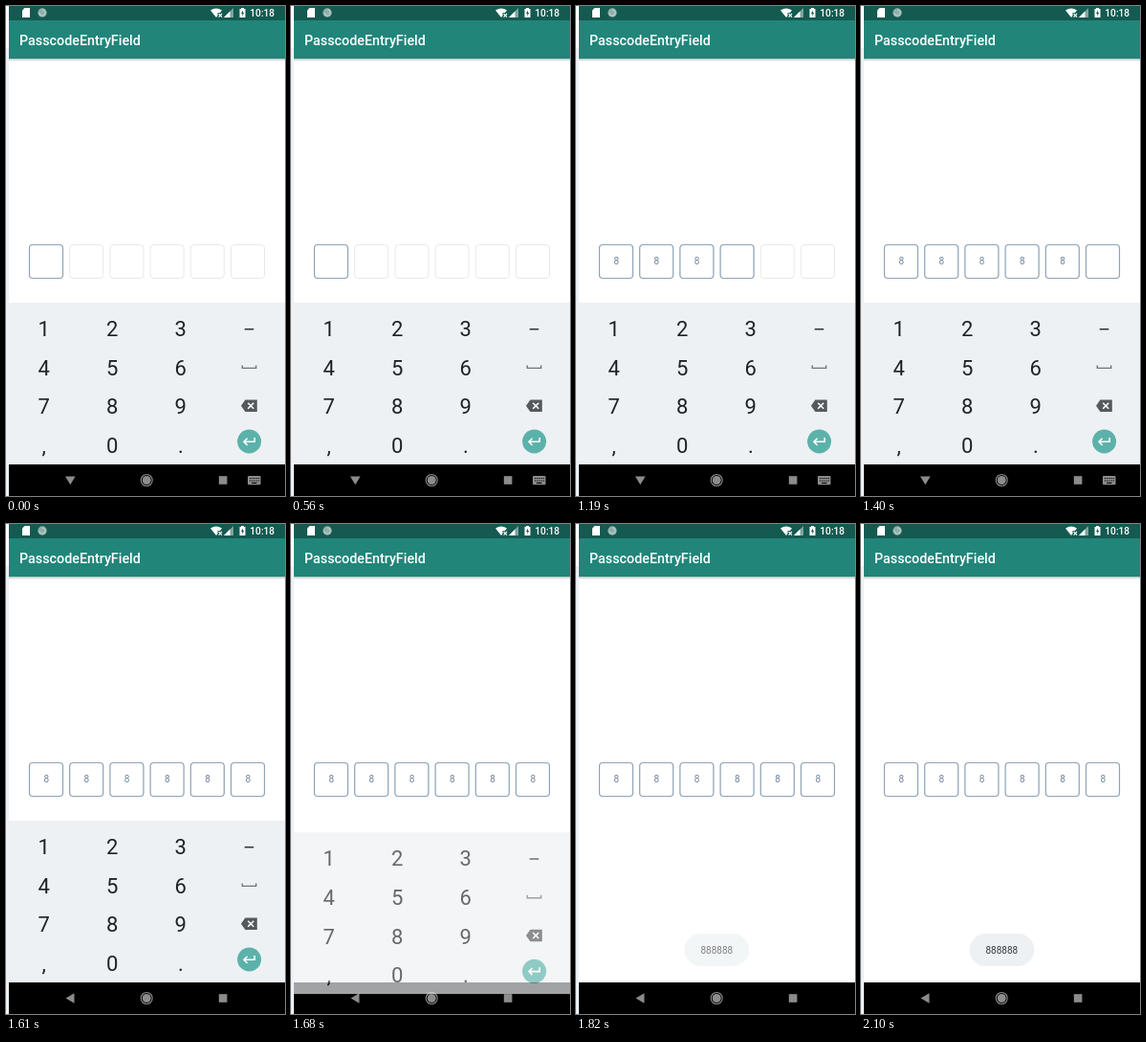
These frames come from a looping animation (292x512 px, 2.17 s). An HTML page:

```html
<!DOCTYPE html>
<html lang="en">
<head>
<meta charset="utf-8">
<title>Passcode entry</title>
<style>
@property --typed { syntax: "<number>"; inherits: true; initial-value: 0; }
html, body { margin: 0; width: 100%; height: 100%; overflow: hidden; background: #fff; }
svg { display: block; width: 100vw; height: 100vh; font-family: Roboto, Arial, sans-serif; }
.loop, #cells { animation: 2170ms step-end infinite; }
#cells { animation-name: type; }
#keyboard { animation-name: slide; }
#toast { animation-name: toast; }
.open { animation-name: open; }
.closed { animation-name: closed; }
.lit { opacity: clamp(0, var(--typed) - var(--i) + 1, 1); }
.digit { opacity: clamp(0, var(--typed) - var(--i), 1); }

@keyframes type {
  0% { --typed: 0; }
  35.48% { --typed: 1; }
  45.16% { --typed: 2; }
  51.61% { --typed: 3; }
  58.06% { --typed: 4; }
  64.51% { --typed: 5; }
  70.96%, 100% { --typed: 6; }
}
@keyframes slide {
  0% { transform: none; opacity: 1; }
  77.41% { transform: translateY(12.3px); opacity: .68; }
  80.64% { transform: translateY(30.5px); opacity: .24; }
  83.87%, 100% { transform: translateY(42px); opacity: 0; }
}
@keyframes toast {
  0% { opacity: 0; }
  80.64% { opacity: .42; }
  83.87% { opacity: .64; }
  87.09% { opacity: .8; }
  90.32% { opacity: .92; }
  93.54% { opacity: .98; }
  96.77%, 100% { opacity: 1; }
}
@keyframes open { 0% { opacity: 1; } 74.19%, 100% { opacity: 0; } }
@keyframes closed { 0% { opacity: 0; } 74.19%, 100% { opacity: 1; } }
</style>
</head>
<body>
<svg viewBox="0 0 292 512">
  <defs>
    <linearGradient id="shade" x2="0" y2="1">
      <stop stop-color="#b9c4c4"/>
      <stop offset="1" stop-color="#fff"/>
    </linearGradient>
  </defs>
  <rect width="292" height="512" fill="#fff"/>
  <rect y="44" width="3" height="468" fill="#edf1f5"/>

  <!-- app bar -->
  <rect x="3" y="55" width="289" height="3" fill="url(#shade)"/>
  <rect x="3" y="15" width="289" height="40" fill="#21857a"/>
  <text x="14" y="41" font-size="14.3" font-weight="500" fill="#fff">PasscodeEntryField</text>

  <!-- status bar -->
  <rect x="3" width="289" height="15" fill="#145a50"/>
  <g fill="#fff">
    <path d="M19.5 2H25V12H17V4.5Z"/>
    <circle cx="38" cy="7" r="4.7" fill="#8fb0aa"/>
    <path d="M38 3.8A3.2 3.2 0 1 1 34.8 7" fill="none" stroke="#c3d5d2"/>
    <path d="M214 4.6Q220 .2 226 4.6L224 7H221.5V10.2L220 12Z"/>
    <path d="M222.6 8L226 11.6M226 8L222.6 11.6" stroke="#fff" stroke-width="1.1"/>
    <path d="M228 12L238 2V12Z" opacity=".45"/>
    <path d="M228 12L234.5 5.5V12Z"/>
    <path d="M244.5 3H246V2H249V3H250.5V12H244.5Z"/>
    <path d="M248 4.5L246 8H247.3V10.5L249.2 7H248Z" fill="#145a50"/>
    <text x="255.3" y="11" font-size="10.2" font-weight="500">10:18</text>
  </g>

  <g id="cells" text-anchor="middle" font-size="10"></g>

  <!-- navigation bar -->
  <rect x="3" y="479" width="289" height="33" fill="#000"/>
  <g fill="#8c8c8c">
    <circle cx="147.2" cy="495.5" r="6" fill="none" stroke="#8c8c8c" stroke-width="1.1"/>
    <circle cx="147.2" cy="495.5" r="4.5"/>
    <rect x="222.8" y="491.2" width="8.6" height="8.6"/>
    <path class="loop closed" d="M62.5 495.5L71.5 490.3V500.7Z"/>
    <g class="loop open">
      <path d="M62 491.5H72.6L67.3 500.3Z"/>
      <rect x="253" y="491" width="13.5" height="9.2" rx="1"/>
      <path d="M255 493.5H265M255 496H265" stroke="#000" stroke-width="1.1" stroke-dasharray="1.2 1"/>
      <path d="M257 498.4H262.5" stroke="#000" stroke-width="1.1"/>
    </g>
  </g>

  <g id="keyboard" class="loop">
    <rect x="3" y="310" width="289" height="169" fill="#edf1f4"/>
    <g id="keys" text-anchor="middle" font-size="22" fill="#202326"></g>
    <path d="M249.7 337.7H259.3" stroke="#34383b" stroke-width="1.6"/>
    <path d="M247.3 375.5V378.4H261.7V375.5" fill="none" stroke="#717579" stroke-width="1.4"/>
    <path d="M246 417.7L250.4 411.5H262.8V424H250.4Z" fill="#55595d"/>
    <path d="M253.2 414.7L259.2 420.7M259.2 414.7L253.2 420.7" stroke="#fff" stroke-width="1.6"/>
    <circle cx="254.6" cy="455" r="12.5" fill="#5cb2aa"/>
    <path d="M260.2 451V455.3H249.2M252.6 451.7L249 455.3L252.6 458.9" fill="none" stroke="#fff" stroke-width="1.6"/>
  </g>

  <g id="toast" class="loop">
    <rect x="113.5" y="428" width="67.8" height="34" rx="17" fill="#edf1f4"/>
    <text x="147.3" y="448.7" text-anchor="middle" font-size="10" fill="#35383b">888888</text>
  </g>
</svg>
<script>
const keyRows = ["123", "456", "789", ",0."];
const box = (x, attrs) =>
  `<rect x="${x}" y="249.5" width="35" height="35" rx="3.5" fill="#fff" ${attrs}/>`;

document.getElementById("cells").innerHTML = Array.from({ length: 6 }, (_, i) => {
  const x = 24.5 + 42.2 * i;
  return `<g style="--i:${i}">
    ${box(x, 'stroke="#e6e9ec"')}
    ${box(x, 'class="lit" stroke="#8fa3b5" stroke-width="1.2"')}
    <text class="digit" x="${x + 17.7}" y="269.5" fill="#70849c">8</text>
  </g>`;
}).join("");

document.getElementById("keys").innerHTML = keyRows.map((row, r) =>
  [...row].map((key, c) =>
    `<text x="${39.6 + 71.6 * c}" y="${345.2 + 40.6 * r}">${key}</text>`).join("")
).join("");
</script>
</body>
</html>
```
